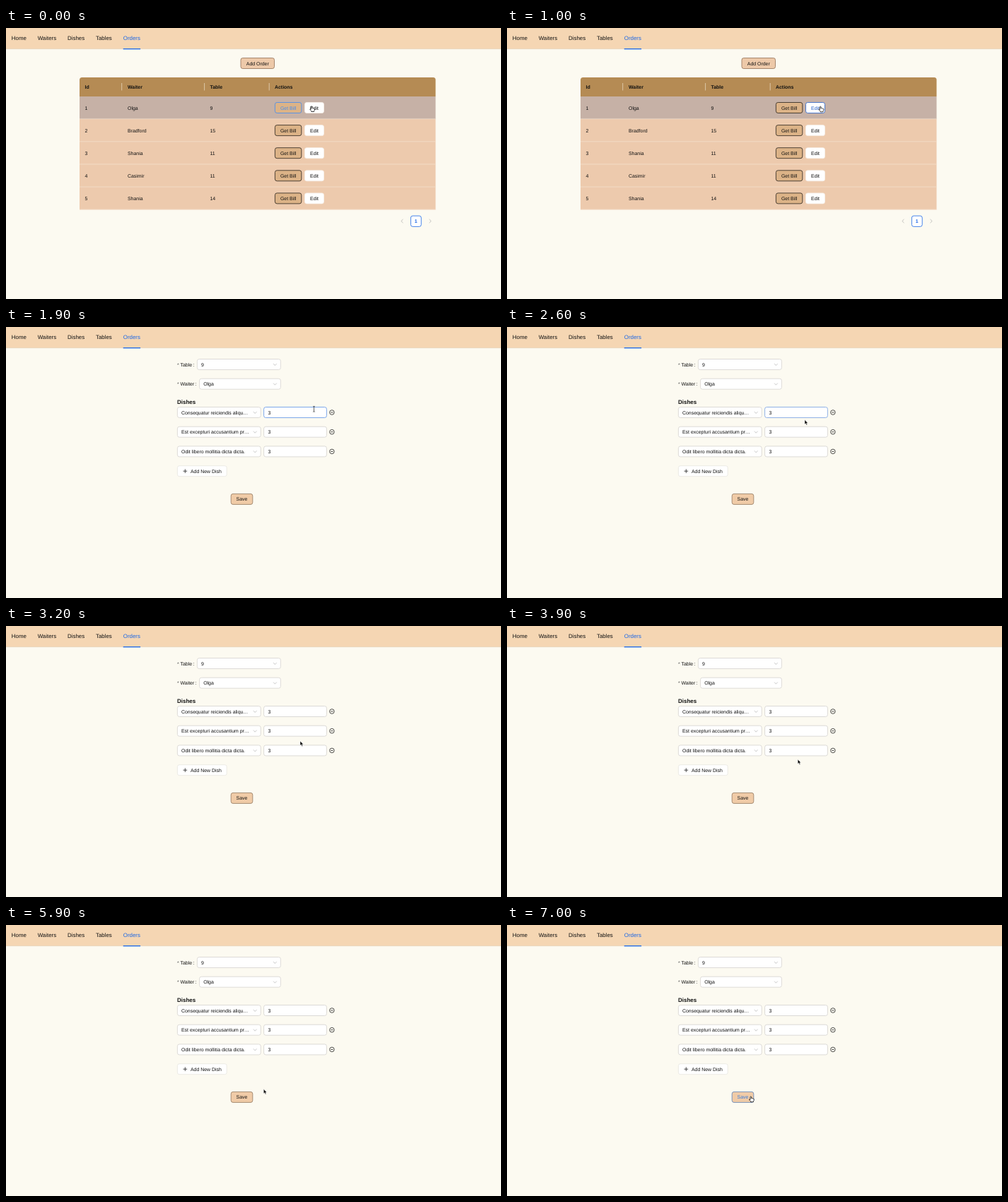
Animation, 700 px wide and 384 px high, one loop 7100 ms. Source, as an HTML page:

```html
<!DOCTYPE html>
<html lang="en">
<head>
<meta charset="utf-8">
<title>Orders</title>
<style>
  html, body { margin: 0; width: 100%; height: 100%; overflow: hidden; background: #fcfaf1; }
  svg { display: block; width: 100%; height: 100%; }
  text { font-family: "Liberation Sans", Arial, sans-serif; font-size: 6.93px; fill: #111; text-rendering: geometricPrecision; }
  .nav { font-size: 7.9px; }
  .bold { font-weight: bold; }
  .mid { text-anchor: middle; }
</style>
</head>
<body>
<svg id="stage" viewBox="0 0 700 384"></svg>
<script>
const LOOP = 7100, STEP = 100;
const BLUE = [64, 140, 245], BLACK = [17, 17, 17], GREY = [212, 210, 206];

const rect = (x, y, w, h, fill, stroke = 'none', r = 2.8, extra = '') =>
  `<rect x="${x}" y="${y}" width="${w}" height="${h}" rx="${r}" fill="${fill}" stroke="${stroke}" stroke-width=".8" ${extra}/>`;
const text = (x, y, str, cls = '', extra = '') => `<text x="${x}" y="${y}" class="${cls}" ${extra}>${str}</text>`;
const line = (d, color, width = .8, extra = '') =>
  `<path d="${d}" fill="none" stroke="${color}" stroke-width="${width}" ${extra}/>`;
const button = (id, x, y, w, label, fill, stroke) =>
  `<g id="${id}">${rect(x, y, w, 15, fill, stroke)}${text(x + w / 2, y + 10, label, 'mid')}</g>`;
const chevron = (x, y) => line(`M${x - 2.3} ${y - 1.1}l2.3 2.6l2.3-2.6`, '#b5b5b5', .7);
const select = (x, y, w, label) =>
  rect(x, y, w, 15, '#fff', '#d6d4d0') + text(x + 5.6, y + 10, label) + chevron(x + w - 8, y + 7.5);

function navBar() {
  const items = [['Home', 7.8], ['Waiters', 44.7], ['Dishes', 87], ['Tables', 127], ['Orders', 165.8]];
  return rect(0, 0, 700, 29.5, '#f5d6b3', 'none', 0) + line('M0 29.6H700', '#e6cfb2', .7) +
    items.map(([s, x]) => text(x, 17.2, s, 'nav', s === 'Orders' ? 'style="fill:#1a66e6"' : '')).join('') +
    rect(165.7, 29, 24.4, 1.3, '#1a66e6', 'none', 0);
}

function ordersTable() {
  const columns = [111.5, 172, 288.5, 380];
  const orders = [['Olga', 9], ['Bradford', 15], ['Shania', 11], ['Casimir', 11], ['Shania', 14]];
  let out = button('add', 332, 42.5, 47.5, 'Add Order', '#edc9a9', '#927056');
  out += '<path d="M104 97V73.500q0-3.500 3.500-3.500H604q3.500 0 3.500 3.500V97Z" fill="#b58b54"/>';
  ['Id', 'Waiter', 'Table', 'Actions'].forEach((s, i) => out += text(columns[i], 85.9, s, 'bold'));
  out += line('M163.700 78v10.500M280.600 78v10.500M372.200 78v10.500', '#e6d6bd', .8);
  orders.forEach(([waiter, table], i) => {
    const y = 97 + i * 32.1, top = y + 8.5;
    out += rect(104, y, 503.5, 32.1, i ? '#edcaad' : '#c6b1a6', 'none', 0);
    out += line(`M104 ${y + 31.8}H607.5`, '#f5e3d1', .7);
    [i + 1, waiter, table].forEach((s, c) => out += text(columns[c], y + 18.6, s));
    out += button('bill' + i, 380.4, top, 37.4, 'Get Bill', '#dcb387', '#29231c');
    out += button('edit' + i, 422.5, top, 27, 'Edit', '#fff', '#f7efe8');
  });
  return out + line('M561.500 271l-2.700 2.600l2.700 2.600M598.500 271l2.700 2.600l-2.700 2.600', '#aaa', .7) +
    rect(572.4, 266.2, 14.8, 15.2, '#fff', '#1a66e6') +
    text(579.8, 276.2, '1', 'bold mid', 'style="fill:#1a66e6"');
}

function loader() {
  const dots = [[356, 68.6], [362, 75.2], [355, 81.1], [349.5, 74.1]];
  return dots.map(([x, y]) => `<circle cx="${x}" cy="${y}" r="2.500" fill="#adc3ee"/>`).join('') +
    text(355.8, 93, 'Loading', 'mid', 'style="fill:#1a66e6"');
}

const dishTops = [113.5, 141.2, 168.9];
function orderForm() {
  const dishes = ['Consequatur reiciendis aliqu…', 'Est excepturi accusantium pr…', 'Odit libero mollitia dicta dicta.'];
  let out = '';
  [['Table', 270.4, 45.5, '9'], ['Waiter', 273.6, 73.2, 'Olga']].forEach(([label, x, y, value]) => {
    out += text(242, y + 10.2, '*', '', 'style="fill:#555"') + text(246.5, y + 10, label) + text(x - 6, y + 10, ':');
    out += select(x, y, 388.4 - x, value);
  });
  out += text(242, 109.3, 'Dishes', 'bold', 'style="font-size:8px"');
  dishes.forEach((dish, i) => {
    const y = dishTops[i], mid = y + 7.5;
    out += select(242.4, y, 117.8, dish);
    out += rect(364.6, y, 88.8, 15, '#fff', '#d4d2ce', 2.8, `id="qty${i}"`) + text(370.6, y + 10, '3');
    out += `<circle cx="460.900" cy="${mid}" r="3.300" fill="none" stroke="#222" stroke-width=".8"/>` +
      line(`M459.2 ${mid}h3.4`, '#222', .8);
  });
  out += rect(242.4, 196.7, 69.8, 15, '#fff', '#e8e6e0') + line('M250.500 204.200h5.600m-2.800-2.800v5.600', '#222', .8);
  return out + text(261, 206.7, 'Add New Dish') + button('save', 318.2, 236.4, 30.6, 'Save', '#f0cba7', '#92775d');
}

function cursors() {
  const edge = 'stroke="#fff" stroke-width=".5" stroke-linejoin="round"';
  return `<g id="cursor">
    <path id="arrow" d="M0 0V6.300L1.400 5L2.500 7.500L3.600 7L2.600 4.700H4.500Z" fill="#000" ${edge}/>
    <path id="hand" d="M-.8 .8Q0-.4 .8 .8V3Q1.600 2.400 2.200 3.200Q3 2.600 3.500 3.600Q4.500 3.200 4.500 4.500Q4.600 6 3.700 7V8H-.2V7.200Q-1.500 6-2.300 4.700Q-2.300 3.700-.8 4.800Z" fill="#fff" stroke="#111" stroke-width=".8" stroke-linejoin="round"/>
    <path id="beam" d="M-1.300-4Q0-4 0-3.200Q0-4 1.300-4M0-3.200V3.200M-1.300 4Q0 4 0 3.200Q0 4 1.300 4" fill="none" stroke="#222" stroke-width=".7"/>
  </g>`;
}

const stage = document.getElementById('stage');
stage.innerHTML = rect(0, 0, 700, 384, '#fcfaf1', 'none', 0) + navBar() +
  `<g id="table">${ordersTable()}</g><g id="loading">${loader()}</g><g id="form">${orderForm()}</g>` + cursors();

const el = id => document.getElementById(id);
const show = (id, on) => el(id).setAttribute('display', on ? 'inline' : 'none');
const clamp = v => Math.max(0, Math.min(1, v));
const mix = (a, b, k) => `rgb(${a.map((v, i) => Math.round(v + (b[i] - v) * k))})`;
function tint(id, border, label) {
  const [box, caption] = el(id).children;
  box.setAttribute('stroke', border);
  caption.style.fill = label;
}

// time, x, y of the pointer tip
const path = [
  [0, 432, 110.5], [400, 443.3, 110.8], [1000, 443.3, 110.8], [1100, 442.4, 111], [1600, 442.4, 111],
  [2400, 424, 125], [2600, 421, 131.6], [3200, 416, 163], [3900, 411.2, 189], [4000, 410.6, 190.5],
  [4800, 407.6, 206.2], [5500, 407.6, 206.2], [5900, 364.3, 232.6], [6300, 344.8, 242.7], [LOOP, 344.8, 242.7]
];
function pointer(t) {
  const i = Math.max(1, path.findIndex(p => p[0] >= t));
  const [a, b] = [path[i - 1], path[i]];
  const k = clamp((t - a[0]) / (b[0] - a[0]));
  return [a[1] + (b[1] - a[1]) * k, a[2] + (b[2] - a[2]) * k];
}
function isOver(i, t) {
  const y = pointer(t)[1];
  return t >= 1600 && y > dishTops[i] && y < dishTops[i] + 15;
}

function render(t) {
  const onTable = t < 1100, onForm = t >= 1200;
  show('table', onTable);
  show('loading', !onTable && !onForm);
  show('form', onForm);

  const left = clamp(t / 200), entered = clamp((t - 50) / 200), pressed = t >= 1000;
  tint('bill0', mix(BLUE, [41, 35, 28], left), mix(BLUE, BLACK, left));
  tint('edit0', pressed ? '#2560c8' : mix([247, 239, 232], BLUE, entered),
    pressed ? '#2560c8' : mix(BLACK, BLUE, entered));

  dishTops.forEach((_, i) => {
    const glow = isOver(i, t) ? 1 : isOver(i, t - STEP) ? .8 : 0;
    el('qty' + i).setAttribute('stroke', mix(GREY, [92, 146, 230], glow));
  });

  const saving = clamp((t - 6100) / 200), clicked = t >= 7000;
  tint('save', clicked ? '#5b7fb8' : mix([146, 119, 93], BLUE, saving),
    clicked ? '#347bdc' : mix(BLACK, BLUE, saving));

  const [x, y] = pointer(t);
  const shape = onTable || t >= 6400 ? 'hand' : dishTops.some((_, i) => isOver(i, t)) ? 'beam' : 'arrow';
  ['arrow', 'hand', 'beam'].forEach(id => show(id, id === shape));
  el('cursor').setAttribute('transform', `translate(${x} ${y})`);
}

const start = performance.now();
function tick() {
  const t = (performance.now() - start) % LOOP;
  render(Math.floor(t / STEP) * STEP);
  requestAnimationFrame(tick);
}
tick();
</script>
</body>
</html>
```
